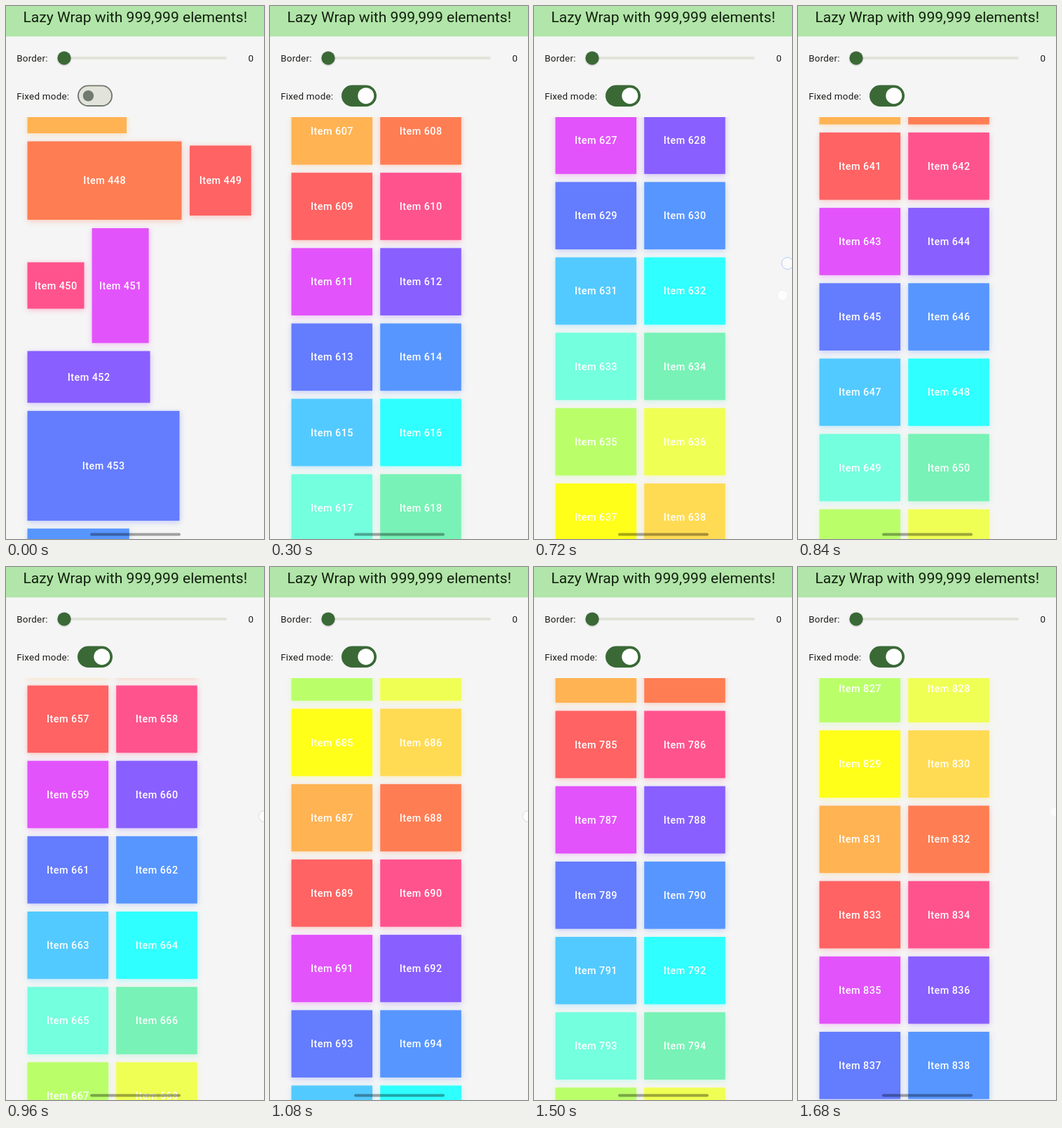
Write an HTML page with a canvas that moves like this. It is 368 px wide and 758 px high and loops after 1740 ms.

```html
<!DOCTYPE html>
<html lang="en">
<head>
<meta charset="utf-8">
<title>Lazy Wrap</title>
<style>
html, body { margin: 0; width: 100%; height: 100%; overflow: hidden; background: #f5f5f5; }
canvas { display: block; width: 368px; height: 758px; }
</style>
</head>
<body>
<canvas id="stage"></canvas>
<script>
const W = 368, H = 758, LOOP = 1740, STEP = 60, LIST_TOP = 158;
const canvas = document.getElementById('stage');
const dpr = window.devicePixelRatio || 1;
canvas.width = W * dpr;
canvas.height = H * dpr;
const ctx = canvas.getContext('2d');
ctx.scale(dpr, dpr);

// Material accent colours, chosen by item number modulo 16
const ACCENTS = ['ff6e40', 'ff5252', 'ff4081', 'e040fb', '7c4dff', '536dfe', '448aff', '40c4ff',
  '18ffff', '64ffda', '69f0ae', 'b2ff59', 'eeff41', 'ffff00', 'ffd740', 'ffab40'].map(rgb);

// Free layout: first item number, then x, y, width, height of each tile
const FIRST = 447;
const WRAP = [
  [30.5, 100, 141.5, 81], [30.5, 192.5, 220, 111.5], [262, 198.5, 87.7, 99.5],
  [30.5, 364.5, 81, 66], [122.6, 316, 81, 163.3], [30.5, 490.7, 175, 73.6],
  [30.5, 575.8, 217, 156.2], [30.5, 743.2, 145.3, 90]
];

// Fixed layout: row 305 stands at y 174.3 when the scroll is 0
const PITCH = 107.17, TILE_W = 115.6, TILE_H = 95.7;
const SCROLL = [[420, -170], [480, -90], [540, 0], [720, 888.5], [960, 2470.7],
  [1080, 3938], [1320, 6973.3], [1680, 11623.5]];

// Touch marks: x, y, radius, start, end, fill alpha, outline
const TOUCHES = [
  [354.5, 411.5, 8, 540, 660, 0.9, '#dcdcec'],
  [354.5, 411.5, 7.5, 660, 780, 0.75, '#eeeeee'],
  [361.7, 366, 8.5, 720, 840, 0.5, '#b4c8f4'],
  [368.5, 354.5, 8, 960, 1140, 0.8, '#dadada'],
  [357, 380.3, 8, 1320, 1440, 0.7, '#dcdcf2'],
  [366, 348.5, 6, 1680, 1740, 0.6, '#f8f8f8']
];

function rgb(hex) {
  return [0, 2, 4].map(i => parseInt(hex.slice(i, i + 2), 16));
}
const css = (c, a = 1) => `rgba(${c.map(Math.round)},${a})`;
const mix = (a, b, k) => a + (b - a) * k;
const blend = (a, b, k) => a.map((v, i) => mix(v, b[i], k));

function text(s, x, y, size, color, align = 'left', weight = 400, spacing = 0.24) {
  ctx.font = `${weight} ${size}px Roboto, sans-serif`;
  ctx.letterSpacing = spacing + 'px';
  ctx.textAlign = align;
  ctx.fillStyle = color;
  ctx.fillText(s, x, y);
}

function disc(x, y, r, color) {
  ctx.beginPath();
  ctx.arc(x, y, r, 0, 7);
  ctx.fillStyle = color;
  ctx.fill();
}

function pill(x, y, w, h, color) {
  ctx.beginPath();
  ctx.roundRect(x, y, w, h, h / 2);
  ctx.fillStyle = color;
  ctx.fill();
}

function shadow(color, blur, dy) {
  ctx.shadowColor = color;
  ctx.shadowBlur = blur * dpr;
  ctx.shadowOffsetY = dy * dpr;
}

function tile(n, x, y, w, h) {
  const c = ACCENTS[n % 16];
  shadow(css(c, 0.32), 8, 1.8);
  ctx.fillStyle = css(blend(c, [255, 255, 255], 0.1));
  ctx.fillRect(x, y, w, h);
  shadow('transparent', 0, 0);
  text('Item ' + n, x + w / 2 + 0.2, y + h / 2 + 5.1, 14.4, '#fff', 'center', 500, 0.45);
}

// Smooth curve through the scroll points
function scrollAt(t) {
  const last = SCROLL.length - 1;
  if (t <= SCROLL[0][0]) return SCROLL[0][1];
  if (t >= SCROLL[last][0]) return SCROLL[last][1];
  const i = SCROLL.findIndex(p => p[0] > t) - 1;
  const slope = j => {
    const a = SCROLL[Math.max(j - 1, 0)], b = SCROLL[Math.min(j + 1, last)];
    return (b[1] - a[1]) / (b[0] - a[0]);
  };
  const [t0, s0] = SCROLL[i], [t1, s1] = SCROLL[i + 1];
  const d = t1 - t0, u = (t - t0) / d, v = 1 - u;
  return v * v * (1 + 2 * u) * s0 + u * u * (3 - 2 * u) * s1
    + d * u * v * (v * slope(i) - u * slope(i + 1));
}

function drawList(t) {
  ctx.save();
  ctx.beginPath();
  ctx.rect(0, LIST_TOP, W, H);
  ctx.clip();
  if (t < 120) {
    WRAP.forEach((box, i) => tile(FIRST + i, ...box));
  } else {
    const origin = 174.3 - scrollAt(t);
    let row = Math.floor((LIST_TOP - origin) / PITCH) - 1;
    for (let y = origin + row * PITCH; y < H + 10; y += PITCH, row++) {
      const n = 2 * (305 + row) + 1;
      tile(n, 30.5, y, TILE_W, TILE_H);
      tile(n + 1, 157.2, y, TILE_W, TILE_H);
    }
  }
  ctx.restore();
}

function drawSwitch(t) {
  const u = Math.min(Math.max((t - 90) / 180, 0), 1);
  const k = u * u * (3 - 2 * u);
  const green = rgb('3a6936'), grey = rgb('72796f');
  pill(102, 112.4, 50, 30.6, css(blend(grey, green, k)));
  pill(103.9, 114.3, 46.2, 26.8, css(blend(rgb('e2e4da'), green, k)));
  const r = t >= 60 ? mix(9, 11.5, k) : 7.7;
  disc(mix(117.4, 136.8, k), 127.7, r, css(blend(grey, [255, 255, 255], k)));
}

function draw(t) {
  ctx.fillStyle = '#f5f5f5';
  ctx.fillRect(0, 0, W, H);
  drawList(t);

  ctx.fillStyle = '#b2e5a9';
  ctx.fillRect(0, 0, W, 43.3);
  text('Lazy Wrap with 999,999 elements!', 184.3, 23.4, 21.1, '#12200f', 'center', 400, 0);

  const ink = '#191d17';
  text('Border:', 15.2, 79, 13.4, ink);
  text('0', 353.3, 79, 13.4, ink, 'right');
  text('Fixed mode:', 15.2, 132.5, 13.4, ink);
  pill(81, 72.1, 234, 3.8, '#e1e3da');
  shadow('rgba(0,0,0,.3)', 2, 0.8);
  disc(83, 74, 9.6, '#3a6936');
  shadow('transparent', 0, 0);
  drawSwitch(t);

  for (const [x, y, r, from, to, alpha, line] of TOUCHES) {
    if (t < from || t >= to) continue;
    disc(x, y, r, `rgba(255,255,255,${alpha})`);
    ctx.strokeStyle = line;
    ctx.lineWidth = 1;
    ctx.stroke();
  }
  pill(120, 749.6, 129, 3.9, 'rgba(0,0,0,.35)');
}

function frame() {
  const t = performance.now() % LOOP;
  draw(Math.floor(t / STEP) * STEP);
  requestAnimationFrame(frame);
}
frame();
</script>
</body>
</html>
```
